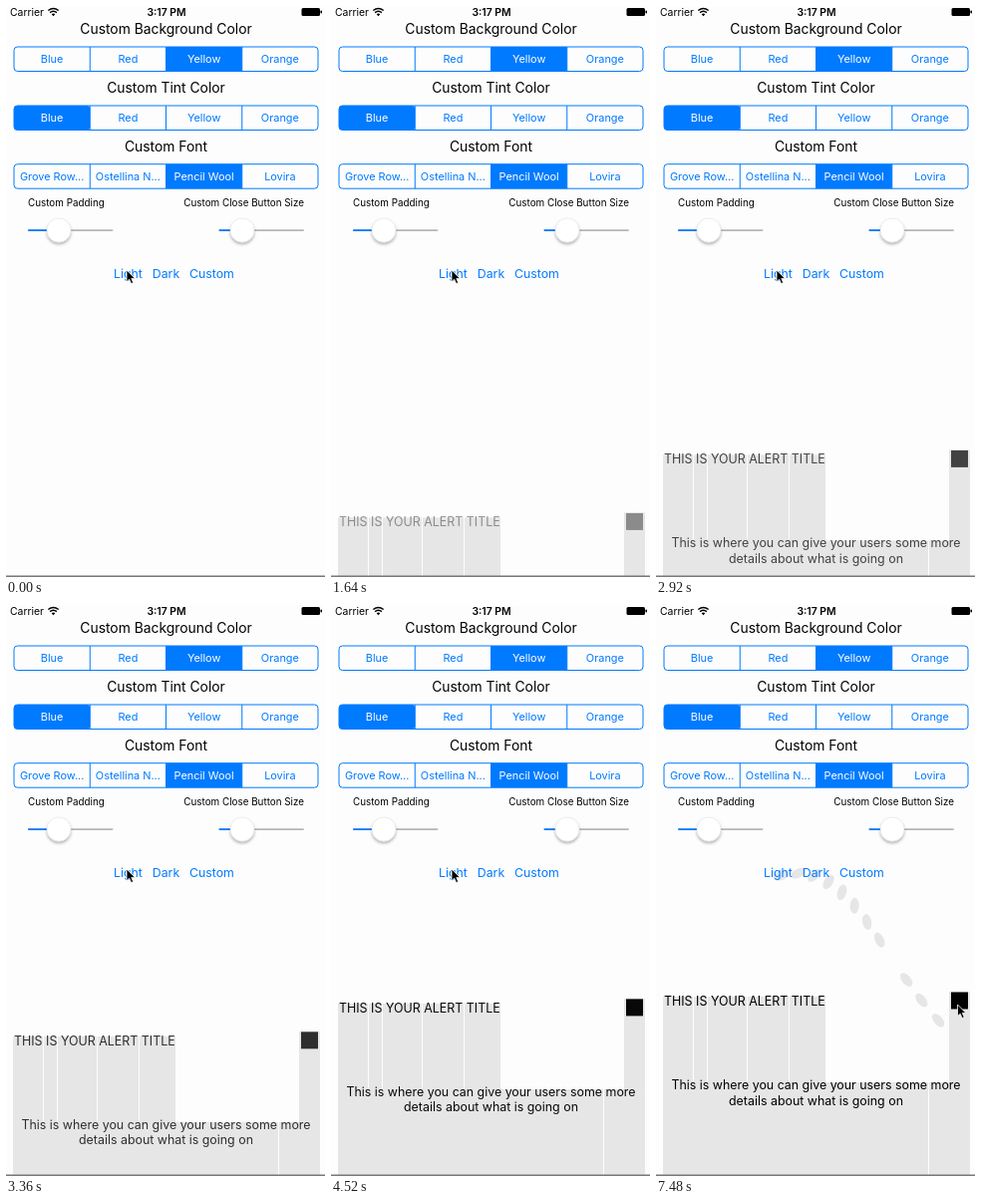
These frames come from a looping animation (320x573 px, 8 s). An HTML page:

```html
<!DOCTYPE html>
<html lang="en">
<head>
<meta charset="utf-8">
<title>Alert demo</title>
<style>
  html, body { margin: 0; width: 100%; height: 100%; overflow: hidden; background: #fdfdfd; }
  svg { display: block; width: 100%; height: 100%; font-family: Inter, "Open Sans", sans-serif; }
  .mid { text-anchor: middle; }
  .end { text-anchor: end; }
</style>
</head>
<body>
<svg id="stage" viewBox="0 0 320 573">
  <defs>
    <clipPath id="screen"><rect width="320" height="572"/></clipPath>
    <filter id="shadow" x="-50%" y="-50%" width="200%" height="200%">
      <feDropShadow dx="0" dy="2" stdDeviation="1.7" flood-opacity=".3"/>
    </filter>
  </defs>
  <rect width="320" height="573" fill="#fdfdfd"/>
  <g id="trail" fill="#e6e6e6"></g>
  <g id="ui"></g>
  <g clip-path="url(#screen)">
    <g id="smear" fill="#e6e6e6"></g>
    <g id="alert"></g>
  </g>
  <rect y="571.5" width="320" height="1.5" fill="#777"/>
  <path id="cursor" d="M0 0V11.6L2.7 9.2L4.6 13.6L6.7 12.7L4.8 8.4H8.4Z" stroke="#fff" stroke-width=".8"/>
</svg>
<script>
const LOOP = 8000, BLUE = '#007aff';
const RISE = { start: 350, length: 4880, distance: 200 };
const MOVE = { start: 5040, end: 5600 };
const PATH = [[125, 272], [200, 250], [222, 362], [302, 436]];
const BLOBS = 12;

const $ = id => document.getElementById(id);

function add(parent, tag, attrs, text) {
  const el = document.createElementNS('http://www.w3.org/2000/svg', tag);
  for (const k in attrs) el.setAttribute(k, attrs[k]);
  if (text) el.textContent = text;
  parent.appendChild(el);
  return el;
}

const rect = (parent, x, y, width, height, more) =>
  add(parent, 'rect', { x, y, width, height, ...more });

const label = (parent, text, x, y, size, more) =>
  add(parent, 'text', { x, y, 'font-size': size, class: 'mid', ...more }, text);

function segments(title, names, chosen, y) {
  const ui = $('ui'), w = 76.25;
  label(ui, title, 160.5, y - 13, 13.86);
  rect(ui, 8 + chosen * w, y, w, 24.5, { fill: BLUE, rx: chosen ? 0 : 3 });
  rect(ui, 8, y, 4 * w, 24.5, { rx: 3.5, fill: 'none', stroke: BLUE });
  names.forEach((name, i) => {
    if (i) add(ui, 'path', { d: `M${8 + i * w} ${y}v24.5`, stroke: BLUE });
    label(ui, name, 8 + (i + .5) * w, y + 16.2, 10.9, { fill: i === chosen ? '#fff' : BLUE });
  });
}

function slider(x, thumb) {
  const ui = $('ui');
  rect(ui, x, 224.2, 85.5, 1.7, { fill: '#b7b7b7', rx: .8 });
  rect(ui, x, 224.2, thumb - x, 1.7, { fill: BLUE, rx: .8 });
  add(ui, 'circle', {
    cx: thumb, cy: 225, r: 12, fill: '#fff', stroke: '#ddd', 'stroke-width': .5, filter: 'url(#shadow)'
  });
}

function statusBar() {
  const ui = $('ui');
  label(ui, 'Carrier', 4, 9.8, 10.4, { class: '' });
  label(ui, '3:17 PM', 161, 9.8, 10.4, { 'font-weight': 600 });
  add(ui, 'path', { d: 'M47.5 10.2L45.7 8.2Q47.5 6.8 49.3 8.2Z' });
  add(ui, 'path', {
    d: 'M44.1 6.6Q47.5 3.9 50.9 6.6M42.3 4.5Q47.5 .4 52.7 4.5',
    fill: 'none', stroke: '#000', 'stroke-width': 1.5
  });
  rect(ui, 296.5, 2, 18.5, 8, { rx: 1.5 });
  rect(ui, 315.5, 4.5, 1.5, 3, { rx: .7 });
}

function build() {
  const ui = $('ui'), alert = $('alert'), smear = $('smear');
  const colors = ['Blue', 'Red', 'Yellow', 'Orange'];
  statusBar();
  segments('Custom Background Color', colors, 2, 41);
  segments('Custom Tint Color', colors, 0, 100);
  segments('Custom Font', ['Grove Row...', 'Ostellina N...', 'Pencil Wool', 'Lovira'], 2, 158.7);
  label(ui, 'Custom Padding', 22, 200.7, 9.85, { class: '' });
  label(ui, 'Custom Close Button Size', 299, 200.7, 9.85, { class: 'end' });
  slider(22, 53);
  slider(213.5, 237);
  [['Light', 122.5], ['Dark', 160.5], ['Custom', 206.5]]
    .forEach(([name, x]) => label(ui, name, x, 272.5, 12.3, { fill: BLUE }));

  // Alert at its resting place
  label(alert, 'THIS IS YOUR ALERT TITLE', 8, 402, 12.45, { class: '' });
  rect(alert, 296, 388.5, 17, 17);
  label(alert, 'This is where you can give your users some more', 160.5, 486, 12.4);
  label(alert, 'details about what is going on', 160.5, 501.5, 12.4);

  // Streaks left below the rising text
  const edges = [7, 38, 52, 92, 134, 171];
  edges.slice(1).forEach((x, i) => rect(smear, edges[i], 393, x - edges[i] - 1, 90));
  rect(smear, 294, 388, 21, 100);
  rect(smear, 7, 478, 164, 300);
  rect(smear, 171, 479, 102, 300);
  rect(smear, 274, 479, 41, 300);

  for (let i = 0; i <= BLOBS; i++) {
    const u = i / BLOBS, [x, y] = along(u), tilt = 75 - 115 * Math.min(1, u * 1.5);
    add($('trail'), 'ellipse', {
      rx: 4.5, ry: 8, transform: `translate(${x} ${y}) rotate(${tilt})`
    });
  }
}

function along(u) {
  const v = 1 - u, w = [v * v * v, 3 * v * v * u, 3 * v * u * u, u * u * u];
  return [0, 1].map(axis => PATH.reduce((sum, p, i) => sum + w[i] * p[axis], 0));
}

const clamp = v => Math.min(1, Math.max(0, v));
const span = (t, from, to) => clamp((t - from) / (to - from));
const mix = (a, b, u) => a + (b - a) * u;

// cubic-bezier(0, 0, .58, 1)
function easeOut(x) {
  let lo = 0, hi = 1;
  for (let i = 0; i < 24; i++) {
    const s = (lo + hi) / 2;
    if (1.74 * (1 - s) * s * s + s * s * s < x) lo = s; else hi = s;
  }
  return lo * lo * (3 - 2 * lo);
}

function cursorAt(t) {
  const u = span(t, MOVE.start, MOVE.end);
  if (!u) return [121, 265];
  if (u < 1) return along(u).map((v, i) => v - [4, 7][i]);
  const back = span(t, MOVE.end, 5760), hover = span(t, 6780, 6920);
  return [mix(mix(298, 301, back), 302.5, hover), mix(mix(429, 410.5, back), 401, hover)];
}

function draw(t) {
  const p = easeOut(span(t, RISE.start, RISE.start + RISE.length));
  const shift = `translate(0 ${RISE.distance * (1 - p)})`;
  $('alert').setAttribute('transform', shift);
  $('alert').setAttribute('opacity', p);
  $('smear').setAttribute('transform', shift);

  const u = span(t, MOVE.start, MOVE.end);
  [...$('trail').children].forEach((blob, i) => {
    const seen = u > i / BLOBS && i !== 8 || u === 1 && i === BLOBS;
    blob.setAttribute('visibility', seen ? 'visible' : 'hidden');
  });
  $('cursor').setAttribute('transform', `translate(${cursorAt(t)})`);
}

build();
function tick() {
  draw(performance.now() % LOOP);
  requestAnimationFrame(tick);
}
tick();
</script>
</body>
</html>
```
